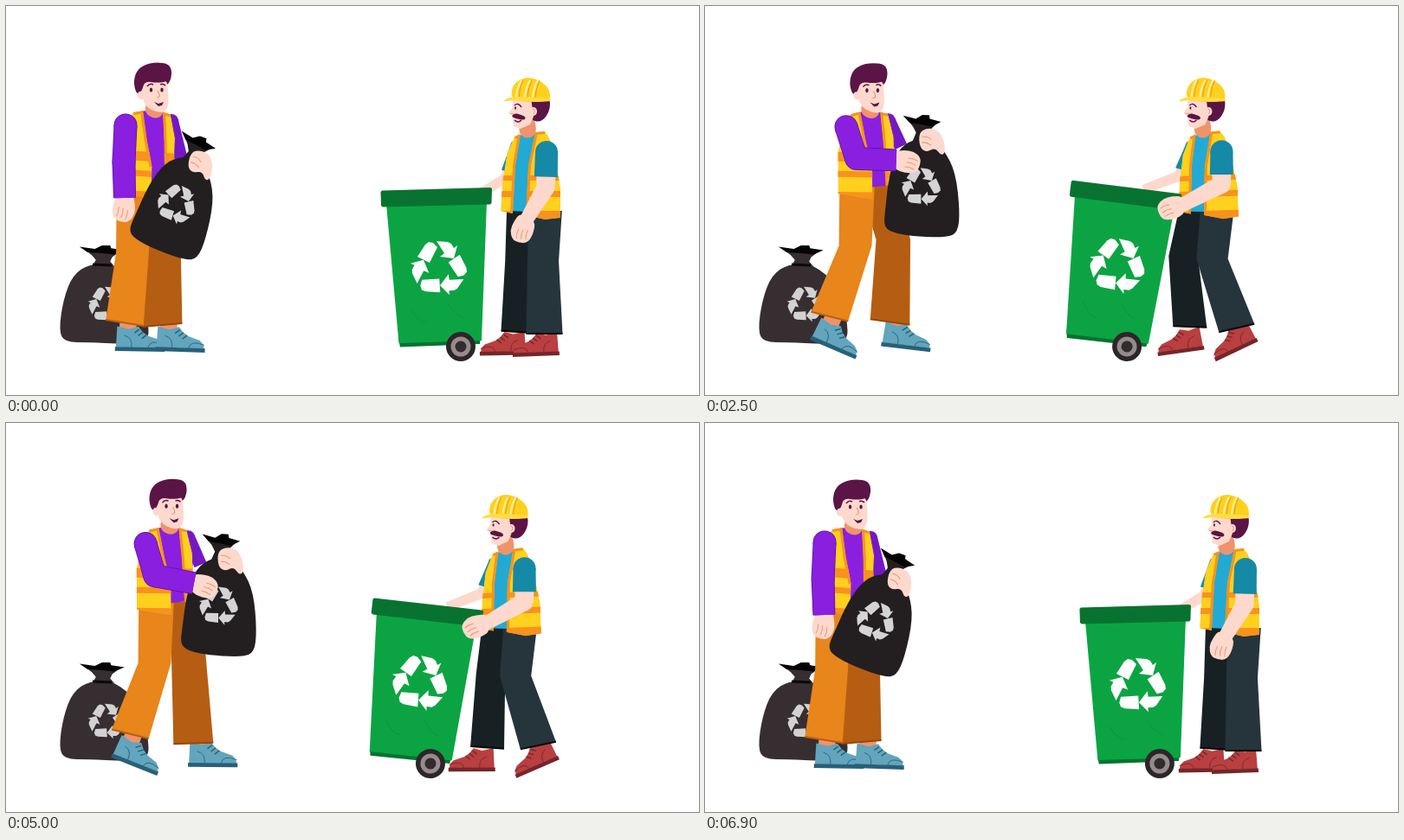
Recreate the animation shown at these times as an HTML page with a canvas. Size 800 by 450 pixels, loop 7000 ms.

```html
<!DOCTYPE html>
<html lang="en">
<head>
<meta charset="utf-8">
<title>Recycling crew</title>
<style>
html, body { margin: 0; width: 100%; height: 100%; overflow: hidden; background: #fff; }
canvas { display: block; width: 800px; height: 450px; }
</style>
</head>
<body>
<canvas id="stage" width="800" height="450"></canvas>
<script>
const ctx = document.getElementById('stage').getContext('2d');
const LOOP = 7000, STEP = 100, STEP_OUT = 3300, TURN = 4150, BLINK = 1700;
const SKIN = '#fdd9cd', SHADE = '#f0936c', LINE = '#5b1446';
const YELLOW = '#ffd01e', ORANGE = '#f7921e', PURPLE = '#8a1fe0', TEAL = '#1689a6';
let walk = 0;   // 0 standing, 1 full step forward
let lift = 0;   // raised front foot, on the way out only
let blink = false;

const clamp = u => Math.min(1, Math.max(0, u));
const ease = u => (1 - Math.cos(Math.PI * clamp(u))) / 2;
const blend = (a, b, u) => a + (b - a) * u;
const angle = (x, y) => Math.atan2(y, x) * 180 / Math.PI;

// From the standing pose to the stepped pose, with an offset while the foot is raised.
const mix = (from, to, raised = []) =>
  from.map((v, i) => blend(v, to[i], walk) + (raised[i] || 0) * lift);

function setTime(ms) {
  const t = Math.floor(ms % LOOP / STEP) * STEP;
  walk = ease(t / STEP_OUT) - ease((t - TURN) / (LOOP - TURN));
  lift = Math.sin(Math.PI * clamp(t / STEP_OUT)) ** 2;
  blink = t > 0 && t % BLINK < STEP;
}

function place([x, y, deg], ox, oy, draw) {
  ctx.save();
  ctx.translate(x, y);
  ctx.rotate(deg * Math.PI / 180);
  ctx.translate(-ox, -oy);
  draw();
  ctx.restore();
}

function trace(p) {
  ctx.beginPath();
  for (let i = 0; i < p.length; i += 2) ctx.lineTo(p[i], p[i + 1]);
}

function poly(color, p) {
  trace(p);
  ctx.closePath();
  ctx.fillStyle = color;
  ctx.fill();
}

// Closed smooth curve pulled towards each point.
function blob(color, p) {
  const n = p.length;
  ctx.beginPath();
  for (let i = 0; i <= n; i += 2) {
    const x = p[i % n], y = p[(i + 1) % n];
    const mx = (x + p[(i + 2) % n]) / 2, my = (y + p[(i + 3) % n]) / 2;
    if (i) ctx.quadraticCurveTo(x, y, mx, my); else ctx.moveTo(mx, my);
  }
  ctx.fillStyle = color;
  ctx.fill();
}

function line(color, width, p) {
  trace(p);
  ctx.strokeStyle = color;
  ctx.lineWidth = width;
  ctx.lineJoin = 'round';
  ctx.stroke();
}

function arc(color, width, x, y, cx, cy, x2, y2) {
  ctx.beginPath();
  ctx.moveTo(x, y);
  ctx.quadraticCurveTo(cx, cy, x2, y2);
  ctx.strokeStyle = color;
  ctx.lineWidth = width;
  ctx.stroke();
}

function oval(color, x, y, rx, ry = rx) {
  ctx.beginPath();
  ctx.ellipse(x, y, rx, ry, 0, 0, 7);
  ctx.fillStyle = color;
  ctx.fill();
}

// Tapered limb, rounded at every joint but the last.
function limb(color, p, widths) {
  for (let i = 0; i < widths.length - 1; i++) {
    const [x, y, x2, y2] = p.slice(i * 2, i * 2 + 4);
    const len = Math.hypot(x2 - x, y2 - y), nx = (y - y2) / len / 2, ny = (x2 - x) / len / 2;
    const a = widths[i], b = widths[i + 1];
    oval(color, x, y, a / 2);
    poly(color, [x + nx * a, y + ny * a, x2 + nx * b, y2 + ny * b,
      x2 - nx * b, y2 - ny * b, x - nx * a, y - ny * a]);
  }
}

// Sleeve covering the given share of the upper arm.
function sleeve(color, [x, y, ex, ey], share, widths) {
  limb(color, [x, y, blend(x, ex, share), blend(y, ey, share)], widths);
}

function leg(color, hemColor, width, [hipX, hipY, kneeX, kneeY, hemX, hemY, tilt]) {
  const hip = width * .46, knee = width * .43;
  const dx = Math.cos(tilt * Math.PI / 180) * width / 2, dy = Math.sin(tilt * Math.PI / 180) * width / 2;
  const hem = [hemX + dx, hemY + dy, hemX - dx, hemY - dy];
  poly(color, [hipX - hip, hipY, hipX + hip, hipY, kneeX + knee, kneeY, ...hem, kneeX - knee, kneeY]);
  line(hemColor, 2, hem);
}

// Placed by the tip of the sole; dir 1 points left, -1 points right.
function shoe(at, dir, size, upper, sole, sock) {
  place(at, 0, 0, () => {
    ctx.scale(dir * size, size);
    poly(sock, [31, -34, 49, -34, 50, -22, 31, -22]);
    poly(upper, [1, -4, 2, -9, 6, -13, 18, -17, 24, -21, 29, -27, 39, -24, 52, -27, 53, -4]);
    arc(sole, .8, 1, -8, 16, -14, 18, -4);
    arc(sole, .8, 36, -4, 35, -15, 44, -17);
    for (let i = 0; i < 3; i++) line(sole, 1.4, [20 + i * 4, -18 - i * 3, 25 + i * 4, -14 - i * 3]);
    poly(sole, [0, -4.5, 54, -4.5, 54, 0, 0, 0]);
  });
}

function vest(p, bands) {
  ctx.save();
  trace(p);
  ctx.closePath();
  ctx.clip();
  poly(YELLOW, p);
  ctx.fillStyle = ORANGE;
  for (const [y, h] of bands) ctx.fillRect(0, y, 800, h);
  line(ORANGE, 6, p.slice(0, 8));
  ctx.restore();
}

// Palm at the wrist with fingers along +x.
function hand(at, flip = 1) {
  place(at, 0, 0, () => {
    ctx.scale(1, flip);
    blob(SKIN, [-4, -10, 9, -12, 20, -11, 28, -4, 28, 4, 24, 13, 13, 15, -4, 10]);
    for (let i = 0; i < 3; i++) arc(SHADE, 1, 14 - i * 2, i * 5 - 3, 20 - i * 2, i * 5 - 3, 25 - i * 2, i * 5);
  });
}

function recycle(color, x, y, scale) {
  for (let i = 0; i < 3; i++) {
    place([x, y, i * 120], 0, 0, () => {
      ctx.scale(scale, scale);
      poly(color, [-25, -13, -16, -27, -12, -30, -7, -29, -2, -24, -11, -6]);
      poly(color, [-3, -31, 10, -30, 14, -28, 17, -23, 21, -26, 17, -11, 1, -13, 6, -17]);
    });
  }
}

function bagTop(fill) {
  poly(fill, [238, 127, 273, 129, 265, 138, 263, 144, 268, 153, 245, 153, 249, 142, 245, 135]);
  poly('#050405', [233, 123, 248, 126, 255, 121, 263, 121, 264, 125, 277, 128, 267, 134, 253, 132, 241, 131]);
}

function backBag() {
  blob('#372e32', [97, 298, 77, 311, 66, 340, 61, 376, 68, 389, 95, 389, 135, 391, 165, 390, 164, 360, 152, 322, 126, 299]);
  place([112, 277, 0], 0, 0, () => {
    ctx.scale(1.18, .8);
    ctx.translate(-256, -121);
    bagTop('#372e32');
  });
  line('#0b090a', 3, [100, 299, 122, 300]);
  recycle('#d2d2d2', 116, 345, .65);
}

// The bag swings upright while it rises; the far hand holds its neck.
function heldBag() {
  const [x, , tilt] = mix([197, 0, 21], [258, 0, 0]);
  place([x, blend(229, 204, walk ** 1.5), tilt], 258, 204, () => {
    bagTop('#231e20');
    blob('#231e20', [246, 149, 228, 164, 220, 195, 218, 232, 217, 254, 233, 260, 258, 262, 290, 261, 303, 255, 304, 230, 297, 186, 283, 161, 267, 149]);
    recycle('#d4d4d4', 258, 204, .7);
    blob(SKIN, [252, 142, 261, 136, 273, 137, 281, 147, 284, 163, 279, 167, 272, 158, 262, 164, 254, 159]);
    for (const y of [146, 153]) arc(SHADE, 1, 256, y, 263, y - 1, 267, y + 3);
  });
}

function collectorHead() {
  blob(SHADE, [162, 110, 180, 116, 182, 126, 172, 131, 160, 124]);
  blob(LINE, [152, 105, 147, 90, 150, 76, 159, 68, 173, 65, 189, 67, 192, 79, 187, 93, 170, 94]);
  oval(SKIN, 156, 103, 4, 5);
  blob(SKIN, [157, 88, 172, 86, 186, 85, 187, 99, 188, 113, 184, 123, 174, 123, 162, 117, 156, 104]);
  blob(LINE, [153, 100, 152, 85, 165, 78, 190, 76, 188, 87, 175, 89, 160, 87, 157, 98]);
  for (const x of [167.5, 180]) {
    if (blink) arc(LINE, 1.4, x - 3, 97, x, 94, x + 3, 97);
    else oval(LINE, x, 97, 1.7, 2.6);
  }
  arc(LINE, 1.5, 163, 93, 166, 89, 170, 91);
  arc(LINE, 1.5, 178, 91, 181, 89, 184, 92);
  arc(SHADE, 1.1, 175, 98, 180, 106, 174, 106);
  poly(LINE, [171, 111, 176, 113, 182, 111, 180, 115, 176, 116]);
}

function collectorTorso() {
  const bands = [[168, 11], [190, 7], [214, 9]];
  poly(PURPLE, [170, 124, 183, 121, 205, 121, 214, 124, 221, 150, 220, 205, 196, 208, 165, 208, 160, 160]);
  vest([170, 124, 181, 121, 188, 155, 196, 185, 197, 222, 157, 216, 156, 168, 164, 132], bands);
  vest([213, 123, 204, 121, 208, 155, 212, 206, 222, 204, 220, 150], bands);
}

function collectorArm() {
  const [sx, sy, ex, ey] = mix([138, 138, 136, 180], [167, 140, 181, 176]);
  // The wrist sweeps out before it rises.
  const sweep = (a, b, c) => blend(blend(a, b, walk), blend(b, c, walk), walk);
  const wx = sweep(137, 208, 227), wy = sweep(222, 226, 162);
  const arm = [sx, sy, ex, ey, wx, wy];
  hand([wx, wy, angle(wx - ex, wy - ey)]);
  limb('#5d12a6', arm, [27, 27, 26]);
  limb(PURPLE, arm, [25.4, 25.4, 24]);
}

function collector() {
  const blue = ['#62a5bd', '#286078', SHADE];
  shoe(mix([183, 400, 1], [172, 410, 27]), -1, 1.06, ...blue);
  shoe(mix([229.5, 401, 2], [277, 397.5, 0], [-22, 5, 14]), -1, 1.06, ...blue);
  leg('#b55e13', '#93490c', 46, mix([170, 208, 182, 282, 180.5, 369, -5], [204, 206, 218, 264, 225.5, 371, -1], [0, 0, 9, 8, -12, -11, 20]));
  leg('#e8851b', '#b9600f', 44, mix([148, 209, 146, 285, 137, 366.5, 9], [180, 208, 178, 276, 145, 358, 15]));
  limb('#7418c4', mix([191, 133, 203, 180], [215, 132, 230, 160]), [16, 15]);
  place(mix([171, 123, 4], [194, 122, 0], [3, 3, 1]), 194, 122, collectorTorso);
  place(mix([172, 120, 0], [194, 119, 0], [1, 3, 0]), 172, 120, collectorHead);
  heldBag();
  collectorArm();
}

function bin() {
  place(mix([525, 394, 0], [481, 394, 10.1]), 525, 394, () => {
    poly('#087331', [453, 385, 548, 383, 547, 391, 455, 394.5]);
    poly('#0ca443', [439, 229, 555, 227, 549, 387, 453.5, 390]);
    arc('#0a9239', .8, 466, 350, 480, 370, 486, 365);
    arc('#0a9239', .8, 510, 345, 525, 363, 529, 360);
    poly('#087331', [432.5, 215, 434, 213.5, 559, 210, 561, 211, 560.5, 228, 559, 229.5, 435, 232.5, 433, 231]);
    recycle('#fff', 500, 303, 1);
    oval('#2c2628', 525, 394, 17);
    oval('#968a8c', 525, 394, 11.5);
    oval('#332b2d', 525, 394, 6.5);
  });
}

function driverHead() {
  blob(SHADE, [593, 133, 610, 128, 613, 148, 602, 154, 592, 148]);
  blob(LINE, [603, 104, 628, 105, 628, 121, 619, 134, 607, 133, 602, 120]);
  poly(SKIN, [585, 106, 606, 106, 609, 128, 605, 137, 594, 142, 586, 139, 584, 126, 580, 124, 585, 117]);
  oval(SKIN, 609, 122, 4, 5);
  arc(SHADE, 1, 608, 119, 612, 120, 609, 125);
  arc(LINE, 1.4, 587, 115, 591, 111, 595, 117);
  oval(LINE, 588, 118, 1, 1.7);
  arc(SHADE, 1, 582, 124, 584, 126, 586, 124);
  blob(LINE, [583, 128, 587, 124, 592, 125, 600, 128, 599, 132, 591, 131]);
  arc(LINE, 1.5, 587, 132, 591, 136, 595, 132);
  blob(YELLOW, [583, 110, 584, 93, 593, 85, 604, 82, 618, 87, 628, 97, 628, 112]);
  poly(YELLOW, [590, 107, 627, 101, 628, 109, 606, 110]);
  for (const x of [594, 604, 613]) {
    arc('#fff0a0', 2.2, x + 1, 86, x - 4, 94, x - 5, 106);
    arc('#e8a413', 1.2, x + 3, 86, x - 1, 94, x - 2, 107);
  }
  blob('#ffdc45', [572, 111, 582, 105, 598, 105, 630, 107, 628, 111, 600, 110, 584, 109]);
}

function driverTorso() {
  const bands = [[196, 6], [214, 7], [237, 11]];
  poly('#22aad4', [590, 150, 612, 146, 618, 180, 602, 238, 582, 237]);
  vest([587, 151, 594, 148, 588, 185, 585, 240, 571, 237, 573, 205, 578, 172], bands);
  vest([622, 145, 611, 146, 603, 185, 600, 242, 622, 247, 640, 245, 640, 210, 632, 165, 627, 152], bands);
}

function driver() {
  const red = ['#b93f40', '#74262b', SKIN];
  const farArm = mix([586, 160, 577, 199, 551, 215], [554, 160, 543, 196, 499, 212]);
  limb(SKIN, farArm, [8, 12, 11]);
  sleeve(TEAL, farArm, .8, [6, 14]);
  shoe(mix([547, 404.5, -1], [501.5, 403, 0], [32, 4, -17]), 1, 1, ...red);
  shoe(mix([585, 406, -2], [590.5, 412, -29]), 1, 1, ...red);
  leg('#172124', '#05080a', 39, mix([596, 236, 593, 295, 591, 377, 4], [560, 236, 551, 288, 546.5, 375, 4], [0, 0, -10, 0, 15, -9, -4]));
  leg('#26343c', '#05080a', 42, mix([622.5, 237, 620, 295, 621.5, 379, 0], [586, 238, 580, 292, 612.5, 371.5, -15]));
  place(mix([601, 146, 0], [569, 146, -2.5]), 601, 146, driverTorso);
  place(mix([601, 146, 0], [569, 146, 0]), 601, 146, driverHead);
  bin();
  const arm = mix([624, 169, 623, 210, 601, 247], [592, 168, 592, 206, 542, 228]);
  hand([arm[4], arm[5], ...mix([118], [180])], -1);
  limb(SKIN, arm, [24, 21, 16]);
  sleeve(TEAL, arm, .7, [26, 27]);
}

const start = performance.now();
function tick() {
  setTime(performance.now() - start);
  ctx.fillStyle = '#fff';
  ctx.fillRect(0, 0, 800, 450);
  backBag();
  collector();
  driver();
  requestAnimationFrame(tick);
}
tick();
</script>
</body>
</html>
```
